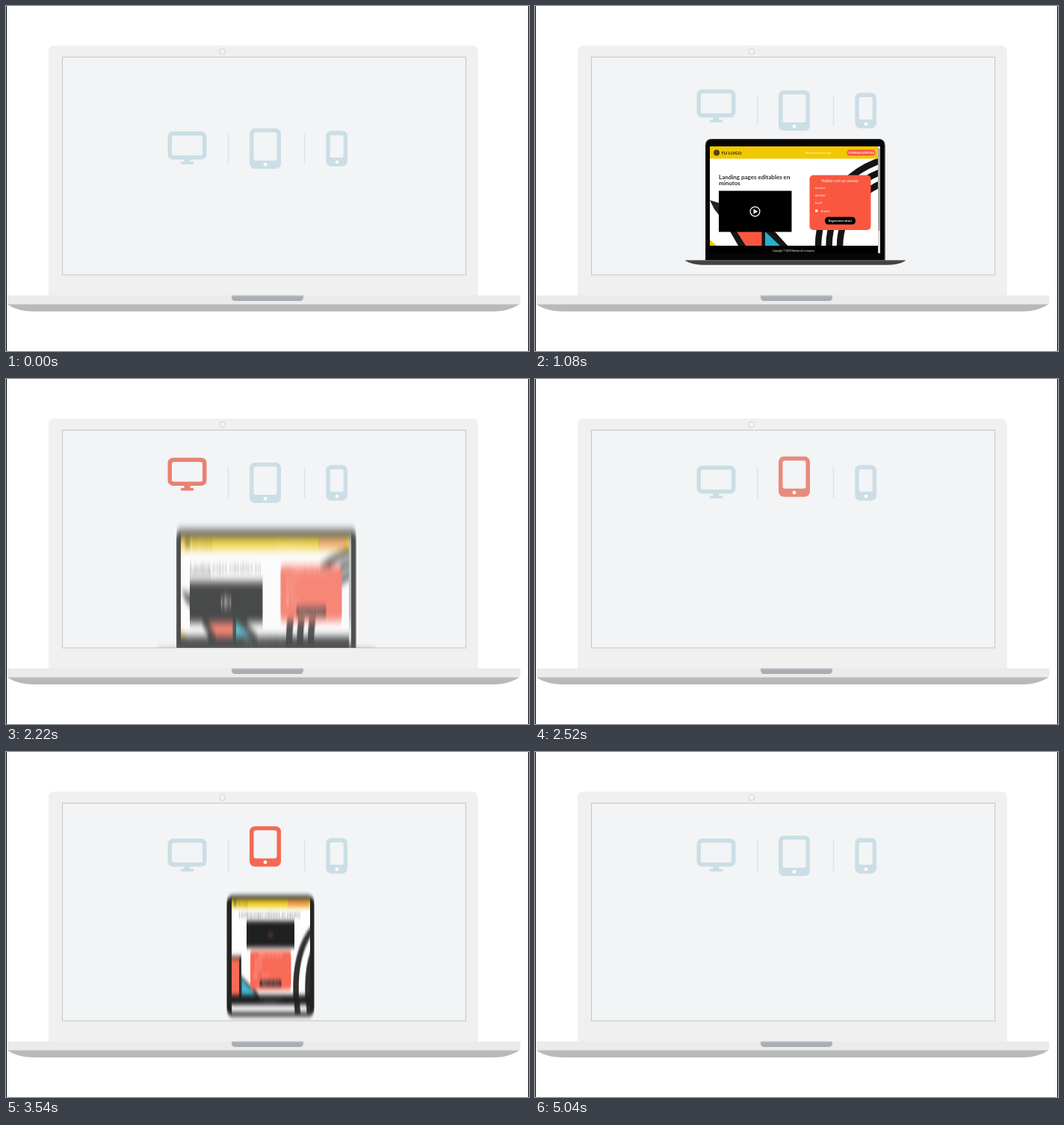
Recreate the animation shown at these times as an HTML page. Size 700 px wide and 462 px high, loop 5220 ms.

```html
<!DOCTYPE html>
<html lang="es">
<head>
<meta charset="utf-8">
<title>Landing pages en cada pantalla</title>
<style>
  html, body { margin: 0; width: 100%; height: 100%; overflow: hidden; background: #fff; }
  svg { display: block; width: 700px; height: 462px; }
  text { font-family: Lato, "Open Sans", sans-serif; }
  .icon { color: #cbdee6; }
  .icon * { fill: currentColor; }
  .icon .hole { fill: #f2f4f6; }
  .icon .dot { fill: #fff; }
  .title { font-weight: 700; fill: #2b2b2b; }
  .brand { font-weight: 900; fill: #4b3c12; }
  .w { fill: #fff; }
  .b { font-weight: 700; }
  .mid { text-anchor: middle; }
  .red { fill: #fa5740; }
  .yellow { fill: #f1c802; }
  .teal { fill: #27b1cb; }
  .mark { fill: #54430f; }
  .arcs { fill: none; stroke: #141414; }
  .play circle { fill: none; stroke: #fff; stroke-width: 1.2; }
  .play path { fill: #fff; }
</style>
</head>
<body>
<svg viewBox="0 0 700 462">
  <defs>
    <clipPath id="stageClip"><rect x="76" y="69" width="539.5" height="291"/></clipPath>
    <clipPath id="deskClip"><rect x="234" y="188" width="228" height="143"/></clipPath>
    <clipPath id="tabClip"><rect x="302" y="193.5" width="105" height="150.5" rx="2"/></clipPath>
    <clipPath id="phoneClip"><path d="M323.5 223H372.5V320Q372.5 326 366.5 326H329.5Q323.5 326 323.5 320Z"/></clipPath>
    <filter id="smear" filterUnits="userSpaceOnUse" x="180" y="80" width="340" height="420" color-interpolation-filters="sRGB">
      <feGaussianBlur stdDeviation="0 1"/>
    </filter>
    <linearGradient id="notch" x2="0" y2="1">
      <stop offset="0" stop-color="#b9bec2"/><stop offset=".4" stop-color="#a8aeb4"/>
    </linearGradient>
    <g id="play" class="play">
      <circle r="6.4"/><path d="M-2 -3.4L3.8 0L-2 3.4Z"/>
    </g>
  </defs>

  <!-- big laptop -->
  <path d="M.5 0V462M699.5 0V462" stroke="#000"/>
  <path d="M57 388V61Q57 53 65 53H623.5Q631.5 53 631.5 61V388Z" fill="#f0f0f0"/>
  <circle cx="289.7" cy="61" r="4" fill="#f3f3f3" stroke="#d2d2d2"/>
  <rect x="75.5" y="68.5" width="540" height="291.5" fill="#f2f4f6" stroke="#c2c6c7"/>
  <path d="M1 387.5H688.5V397L686 400H3L1 397Z" fill="#ebebeb"/>
  <path d="M1.5 399.5H687.5Q672 409 653 409H38Q16 409 1.5 399.5Z" fill="#b9b9b9"/>
  <path d="M302 387.5H398V390Q398 395 393 395H307Q302 395 302 390Z" fill="url(#notch)"/>

  <!-- icon row -->
  <g id="row">
    <path d="M297.6 118.5V159.5M399.6 118.5V159.5" stroke="#e0e4ea" stroke-width="1.8"/>
    <g class="icon" id="deskIcon">
      <rect x="216.5" y="116" width="52" height="37.5" rx="7"/>
      <rect class="hole" x="222" y="121.5" width="41" height="26.5" rx="2.5"/>
      <path d="M238.5 153H246.5V156.5H249.5Q251.5 156.5 251.5 158.3T249.5 160H235.5Q233.6 160 233.6 158.3T235.5 156.5H238.5Z"/>
    </g>
    <g class="icon" id="tabIcon">
      <rect x="326" y="112" width="42" height="54" rx="7"/>
      <rect class="hole" x="331.5" y="117.3" width="31" height="37.7" rx="3"/>
      <circle class="dot" cx="347" cy="160.2" r="2.4"/>
    </g>
    <g class="icon" id="phoneIcon">
      <rect x="428.3" y="115.3" width="28.7" height="47.5" rx="7"/>
      <rect class="hole" x="433.7" y="121" width="18" height="30" rx="2.5"/>
      <circle class="dot" cx="443" cy="157" r="2.3"/>
    </g>
  </g>

  <g clip-path="url(#stageClip)">
    <!-- small laptop -->
    <g id="desk">
      <path d="M228 341V187Q228 178 237 178H459.5Q468.500 178 468.500 187V341Z" fill="#060606"/>
      <path d="M228.800 340V187Q228.800 178.800 237 178.800H459.500Q467.700 178.800 467.700 187V340" fill="none" stroke="#3a3a3a" stroke-width=".8"/>
      <path d="M201 340.500H496Q490 346.800 466 346.800H231Q208 346.800 201 340.500Z" fill="#434141"/>
      <path d="M201 340.800H496" stroke="#777" stroke-width=".8"/>
      <g clip-path="url(#deskClip)">
        <rect class="w" x="234" y="188" width="228" height="143"/>
        <g class="arcs" stroke-width="8.500">
          <circle cx="500" cy="322" r="121"/><circle cx="500" cy="322" r="106.500"/><circle cx="500" cy="322" r="92"/>
        </g>
        <path d="M234 260L247 264V281L240 272Z" fill="#222"/>
        <path class="yellow" d="M234 313L243 321H234Z"/>
        <path d="M260 300H338L338 321H272Z" fill="#161616"/>
        <path class="w" d="M319 300H340V323Z"/>
        <path class="red" d="M270 302H303.500V321H282Z"/>
        <path class="teal" d="M308 302L328 321H308Z"/>
        <rect class="yellow" x="234" y="188" width="226" height="16.500"/>
        <circle class="mark" cx="243" cy="196.500" r="4"/>
        <text class="brand" x="249" y="199" font-size="6.200">TU LOGO</text>
        <text class="w" x="362" y="198.300" font-size="3.400">Bienvenido al sitio web</text>
        <rect class="red" x="417.500" y="192.500" width="38" height="8" rx="4"/>
        <text class="w b mid" x="436.500" y="197.800" font-size="3.200">COMIENZA LA PRUEBA</text>
        <text class="title" font-size="8"><tspan x="246" y="232">Landing pages editables en</tspan><tspan x="246" y="239.500">minutos</tspan></text>
        <rect x="246" y="247.500" width="97.500" height="55"/>
        <use href="#play" x="294.500" y="275.200"/>
        <rect class="red" x="367.500" y="226.500" width="82" height="73.500" rx="5"/>
        <text class="w mid" x="408" y="235.500" font-size="5.400">Hablar con un asesor</text>
        <g class="w" font-size="3.700">
          <text x="375" y="245">Nombre*</text><text x="375" y="255">Apellido*</text>
          <text x="375" y="265">Email*</text><text x="382.500" y="275.500">Acepto*</text>
        </g>
        <rect x="375" y="272.500" width="3.600" height="3.600" rx=".6" fill="#fdd"/>
        <rect x="388" y="282.500" width="41" height="10" rx="4.500"/>
        <text class="w b mid" x="408.500" y="288.900" font-size="3.800">Registrarme ahora</text>
        <rect x="234" y="321" width="226" height="10"/>
        <text class="w mid" x="346" y="328.500" font-size="3.100">Copyright © 2020 Nombre de la empresa</text>
        <rect x="459" y="188" width="3" height="143" fill="#dcdcdc"/>
        <rect x="459.600" y="191" width="1.800" height="110" fill="#8f8f8f"/>
      </g>
    </g>

    <!-- tablet -->
    <g id="tab">
      <rect x="295.500" y="188" width="117" height="161.700" rx="9" fill="#050505"/>
      <circle cx="354" cy="190.700" r=".8" fill="#333"/>
      <g clip-path="url(#tabClip)">
        <rect class="w" x="302" y="193" width="105" height="152"/>
        <g class="arcs" stroke-width="7.500">
          <ellipse cx="431" cy="312" rx="43" ry="90"/><ellipse cx="431" cy="312" rx="27" ry="72"/>
        </g>
        <path d="M302 269H315V296L340 322H302Z" fill="#161616"/>
        <rect class="red" x="302" y="272.500" width="10" height="49"/>
        <path class="teal" d="M315.500 300L335 321.500H315.500Z"/>
        <rect class="yellow" x="302" y="193" width="105" height="11"/>
        <circle class="mark" cx="306.700" cy="198.600" r="2.400"/>
        <text class="brand" x="310" y="200.300" font-size="4">Tu Logo</text>
        <text x="346" y="199.700" font-size="2.500" fill="#f8e69a">Bienvenido al sitio web</text>
        <rect class="red" x="377" y="196.300" width="28" height="4.900" rx="2.200"/>
        <text class="w b mid" x="391" y="199.700" font-size="2.300">COMIENZA LA PRUEBA</text>
        <text class="title mid" x="353" y="215.800" font-size="5.250">Landing pages editables en minutos</text>
        <rect x="322" y="221.800" width="64" height="35.800"/>
        <rect x="350.500" y="238.800" width="7" height="2.600" rx=".6" fill="#7d3a1c"/>
        <rect class="red" x="327" y="261.700" width="54.500" height="52.500" rx="4"/>
        <text class="w b mid" x="354" y="268.200" font-size="3.500">Hablar con un asesor</text>
        <g class="w" font-size="2.700">
          <text x="333" y="275.300">Nombre*</text><text x="333" y="282.500">Apellido*</text>
          <text x="333" y="290">Email*</text><text x="343" y="297">Acepto*</text>
        </g>
        <rect x="332.700" y="294.500" width="2.600" height="2.600" fill="none" stroke="#fff" stroke-width=".5"/>
        <rect x="339" y="302" width="30" height="7.200" rx="3.500"/>
        <text class="w b mid" x="354" y="306.600" font-size="2.800">Registrarme ahora</text>
        <rect x="302" y="321" width="105" height="13.500"/>
        <text class="w mid" font-size="2.500"><tspan x="354" y="327.300">Copyright © 2020 Nombre</tspan><tspan x="354" y="330.800">de la empresa</tspan></text>
      </g>
    </g>

    <!-- phone -->
    <g id="phone">
      <rect x="319.500" y="211.500" width="57.500" height="117.500" rx="9" fill="#050505"/>
      <rect class="w" x="323.500" y="215" width="49" height="111" rx="6"/>
      <path d="M334 214H362Q361 219.200 357 219.200H339Q335 219.200 334 214Z"/>
      <g clip-path="url(#phoneClip)">
        <g id="page">
          <rect class="yellow" x="323" y="223" width="48.300" height="25"/>
          <circle class="mark" cx="340" cy="229" r="2.500"/>
          <text class="brand" x="343.500" y="230.700" font-size="4.200">Tu Logo</text>
          <text class="mid" x="347.500" y="236.700" font-size="2.500" fill="#f8e69a">Bienvenido al sitio web</text>
          <rect class="red" x="333.500" y="239.200" width="28.500" height="6" rx="2.600"/>
          <text class="w b mid" x="347.700" y="243.200" font-size="2.400">COMIENZA LA PRUEBA</text>
          <text class="title mid" font-size="4.900"><tspan x="347.500" y="260.700">Landing pages</tspan><tspan x="347.500" y="265.300">editables en</tspan><tspan x="347.500" y="269.800">minutos</tspan></text>
          <path d="M372 284L364 297L357 309V330H372Z" fill="#1a1a1a"/>
          <rect x="326" y="275.800" width="42.500" height="23.500"/>
          <use href="#play" transform="translate(347.300 287.500) scale(.82)"/>
          <rect class="red" x="326" y="308.200" width="43" height="66" rx="3.500"/>
          <text class="w b mid" font-size="3.900"><tspan x="347.500" y="315.700">Hablar con un</tspan><tspan x="347.500" y="320.300">asesor</tspan></text>
          <g class="w" font-size="3">
            <text x="331" y="331">Nombre*</text><text x="331" y="339">Apellido*</text>
            <text x="331" y="347">Email*</text><text x="336" y="355">Acepto*</text>
          </g>
          <rect x="334" y="361" width="27" height="7" rx="3.500"/>
          <text class="w b mid" x="347.500" y="365.500" font-size="2.700">Registrarme ahora</text>
          <rect x="323" y="380" width="50" height="20"/>
        </g>
      </g>
      <path d="M332.200 268.300V273L333.400 272L334.200 273.600L335 273.200L334.300 271.600H335.600Z" fill="#fff" stroke="#555" stroke-width=".4"/>
    </g>
  </g>
</svg>
<script>
  const LOOP = 5220, TRAVEL = 130, SMEAR = 11;
  const BLUE = [203, 222, 230], RED = [251, 88, 62];
  const $ = id => document.getElementById(id);
  const blur = document.querySelector('#smear feGaussianBlur');

  // Times in ms: device enters, device leaves, icon hops, icon turns red
  const acts = [
    { name: 'desk',  enter: [810, 1070],  leave: [2130, 2430], hop: [1000, 1180], tint: [1080, 1260], lift: 13 },
    { name: 'tab',   enter: [2550, 2820], leave: [3510, 3750], hop: [2430, 2590], tint: [2430, 2590], lift: 13 },
    { name: 'phone', enter: [3720, 3920], leave: [4830, 5040], hop: [3710, 3860], tint: [3710, 3860], lift: 8 },
  ];

  const part = (t, [a, b]) => Math.min(1, Math.max(0, (t - a) / (b - a)));
  const ease = p => p < .5 ? 2 * p * p : 1 - 2 * (1 - p) ** 2;
  const speed = (p, [a, b]) => 4 * Math.min(p, 1 - p) * TRAVEL / (b - a);
  const shift = (el, y) => el.setAttribute('transform', `translate(0 ${y.toFixed(2)})`);

  function drawDevice(t, { name, enter, leave }) {
    const el = $(name), p = part(t, enter), q = part(t, leave);
    const shown = p > 0 && q < 1;
    el.style.display = shown ? '' : 'none';
    if (!shown) return;
    shift(el, TRAVEL * (1 - ease(p) + ease(q)));
    el.setAttribute('opacity', p * (1 - q));
    const v = speed(p, enter) + speed(q, leave);
    if (v > .01) {
      blur.setAttribute('stdDeviation', `0 ${(v * SMEAR).toFixed(2)}`);
      el.setAttribute('filter', 'url(#smear)');
    } else {
      el.removeAttribute('filter');
    }
  }

  function drawIcon(t, { name, leave, hop, tint, lift }) {
    const el = $(name + 'Icon'), q = part(t, leave);
    shift(el, -lift * (ease(part(t, hop)) - ease(q)));
    const k = ease(part(t, tint)) * (1 - q);
    el.style.color = `rgb(${BLUE.map((c, i) => Math.round(c + (RED[i] - c) * k))})`;
  }

  function draw(t) {
    shift($('row'), 52 * (1 - ease(part(t, [810, 1110]))));
    shift($('page'), -62 * ease(part(t, [4270, 4810])));
    for (const act of acts) {
      drawDevice(t, act);
      drawIcon(t, act);
    }
  }

  const start = performance.now();
  function tick() {
    draw((performance.now() - start) % LOOP);
    requestAnimationFrame(tick);
  }
  tick();
</script>
</body>
</html>
```
